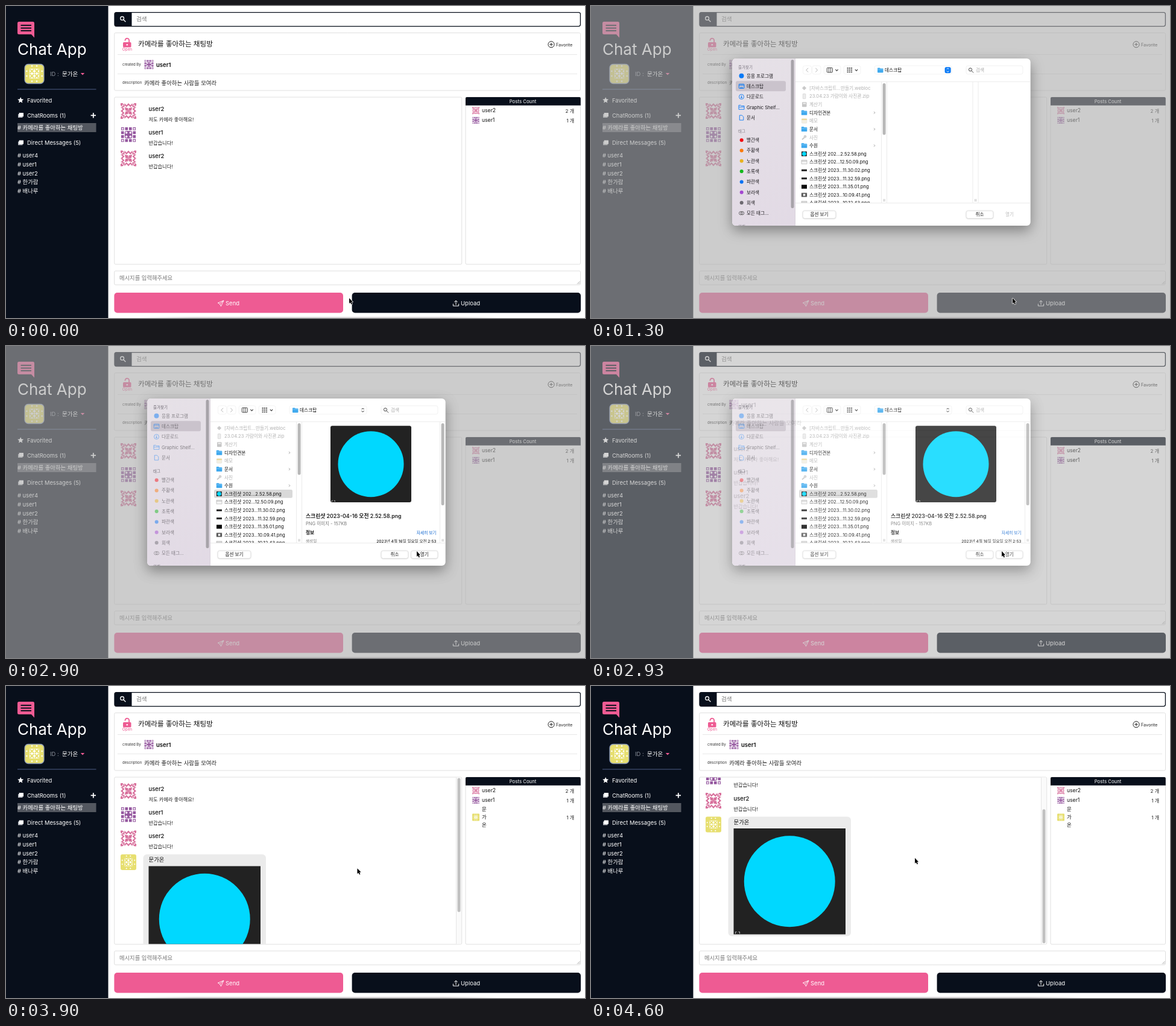
An HTML page with a canvas that plays this animation: 960 by 517 pixels, repeating every 4.73 s.

```html
<!DOCTYPE html>
<html lang="ko">
<head>
<meta charset="utf-8">
<title>Chat App</title>
<style>
html, body { margin: 0; width: 100%; height: 100%; overflow: hidden; background: #fff; }
canvas { display: block; width: 100vw; height: 100vh; }
</style>
</head>
<body>
<script>
const W = 960, H = 517, LOOP = 4730;
const FONT = 'Inter, "Noto Sans CJK KR", "Noto Sans CJK", sans-serif';
const NAVY = '#080f1b', PINK = '#ee5b93', BLUE = '#0a7af6', EDGE = '#e0e0e0';
const ME = '문가온', ONE = 'user1', TWO = 'user2';
const scale = Math.max(1, window.devicePixelRatio || 1);

function layer() {
  const el = document.createElement('canvas');
  el.width = Math.round(W * scale);
  el.height = Math.round(H * scale);
  const g = el.getContext('2d');
  g.scale(scale, scale);
  return [el, g];
}

const [stage, front] = layer();
const [sheet, back] = layer();
document.body.appendChild(stage);
let c = front;

const clamp = v => Math.min(1, Math.max(0, v));
const mix = (a, b, p) => a + (b - a) * p;

function text(s, x, y, size, color = '#111', weight = 400, align = 'left') {
  c.font = `${weight} ${size}px ${FONT}`;
  c.fillStyle = color;
  c.textAlign = align;
  c.fillText(s, x, y);
}

function box(x, y, w, h, r, fill, stroke, lw = 1) {
  c.beginPath();
  c.roundRect(x, y, w, h, r);
  if (fill) { c.fillStyle = fill; c.fill(); }
  if (stroke) { c.strokeStyle = stroke; c.lineWidth = lw; c.stroke(); }
}

function path(pts) {
  c.beginPath();
  for (let i = 0; i < pts.length; i += 2) c.lineTo(pts[i], pts[i + 1]);
}

function poly(pts, fill) {
  path(pts);
  c.fillStyle = fill;
  c.fill();
}

function line(pts, color, lw = 1) {
  path(pts);
  c.strokeStyle = color;
  c.lineWidth = lw;
  c.stroke();
}

function disc(x, y, r, fill, stroke, lw = 1) {
  c.beginPath();
  c.arc(x, y, r, 0, Math.PI * 2);
  if (fill) { c.fillStyle = fill; c.fill(); }
  if (stroke) { c.strokeStyle = stroke; c.lineWidth = lw; c.stroke(); }
}

function clipped(x, y, w, h, draw) {
  c.save();
  c.beginPath();
  c.rect(x, y, w, h);
  c.clip();
  draw();
  c.restore();
}

function lens(x, y, r, color, lw) {
  disc(x, y, r, null, color, lw);
  line([x + r * 0.7, y + r * 0.7, x + r * 2, y + r * 2], color, lw);
}

function star(x, y, r) {
  const pts = [];
  for (let i = 0; i < 10; i++) {
    const a = i * Math.PI / 5 - Math.PI / 2, d = i % 2 ? r * 0.45 : r;
    pts.push(x + d * Math.cos(a), y + d * Math.sin(a));
  }
  poly(pts, '#fff');
}

function diamond(x, y, r, fill) {
  poly([x, y - r, x + r, y, x, y + r, x - r, y], fill);
}

// Avatars live on a 4 x 4 grid: a ring of 12 tiles around a 2 x 2 heart.
const avatars = {
  yellow() {
    const ink = '#e7df70';
    box(0, 0, 4, 4, 0.45, ink);
    for (const i of [1, 3]) {
      const m = i === 1 ? 0.42 : 3.58;
      for (const j of [1.5, 2.5]) {
        diamond(j, m, 0.2, '#fff');
        diamond(m, j, 0.2, '#fff');
      }
    }
    box(1, 1, 2, 2, 0, '#fff');
    for (const x of [1.5, 2.5]) for (const y of [1.5, 2.5]) {
      line([x - 0.4, y - 0.4, x + 0.4, y + 0.4], ink, 0.26);
      line([x - 0.4, y + 0.4, x + 0.4, y - 0.4], ink, 0.26);
    }
  },
  purple() {
    const ink = '#95579f';
    for (let i = 0; i < 16; i++) {
      const x = i % 4, y = i >> 2;
      if (x % 3 && y % 3) continue;
      box(x + 0.14, y + 0.14, 0.72, 0.72, 0, ink);
      if (x % 3 === 0 && y % 3 === 0) diamond(x + 0.5, y + 0.5, 0.26, '#fff');
    }
    box(1.05, 1.05, 1.9, 1.9, 0.5, ink);
    for (const x of [1.5, 2.5]) for (const y of [1.5, 2.5]) diamond(x, y, 0.32, '#fff');
  },
  pink() {
    const ink = '#d8709c';
    for (let side = 0; side < 4; side++) {
      c.save();
      c.translate(2, 2);
      c.rotate(side * Math.PI / 2);
      for (const x of [-1, 0]) {
        poly([x, -2, x + 0.5, -1.45, x + 1, -2, x + 1, -1.5, x + 0.5, -1, x, -1.5], ink);
      }
      poly([-2, -2, -1.5, -2, -1, -1.5, -1, -1, -1.5, -1, -2, -1.5], ink);
      diamond(-1.45, -1.45, 0.22, '#fff');
      poly([-0.95, -0.95, -0.1, -0.75, 0, 0, -0.75, -0.1], ink);
      c.restore();
    }
  }
};

function avatar(kind, x, y, size) {
  c.save();
  c.translate(x, y);
  c.scale(size / 4, size / 4);
  avatars[kind]();
  c.restore();
}

function picture(x, y, w, h, r = 0) {
  box(x, y, w, h, r, '#222');
  disc(x + w / 2, y + h / 2, h * 0.43, '#00d8ff');
  if (w > 50) {
    const k = w / 185;
    line([x + 3 * k, y + h - 1, x + 3 * k, y + h - 4 * k, x + 5 * k, y + h - 4 * k], '#ddd', 0.8);
    line([x + 8 * k, y + h - 4 * k, x + 10 * k, y + h - 4 * k, x + 10 * k, y + h - 1], '#ddd', 0.8);
  }
}

function roomsIcon(y) {
  box(20, y - 2, 7.5, 6, 0.5, '#b9bcc2');
  box(21.6, y - 4, 7.4, 6.2, 0.5, '#fff');
}

function sidebar() {
  box(0, 0, 169.5, H, 0, NAVY);
  box(19, 26, 28, 21, 2.5, PINK);
  poly([41, 46, 47, 43, 47, 52.5], PINK);
  for (const y of [32, 36.6, 41]) line([24.5, y, 42, y], NAVY, 1.9);
  text('Chat App', 19, 81, 26, '#fff');

  box(31, 96, 32, 32, 6, '#fff');
  c.save();
  c.beginPath();
  c.roundRect(31, 96, 32, 32, 6);
  c.clip();
  avatar('yellow', 31, 96, 32);
  c.restore();
  box(31, 96.5, 32, 32, 6, null, '#8796b8', 1.3);
  text('ID :', 73, 116, 9.4, '#8d929b');
  text(ME, 93, 116, 9.5, '#fff', 500);
  poly([123.8, 111, 130.2, 111, 127, 114.6], PINK);
  line([19, 138, 149.5, 138], '#4f5e86');

  star(24.2, 156.3, 5.3);
  text('Favorited', 35, 159.7, 9.4, '#fff');
  roomsIcon(181);
  text('ChatRooms (1)', 35, 184.6, 9.4, '#fff');
  line([140.6, 181.3, 149, 181.3], '#fff', 1.8);
  line([144.8, 177.1, 144.8, 185.5], '#fff', 1.8);
  box(19, 194, 130.5, 15, 0, '#53575f');
  text('# 카메라를 좋아하는 채팅방', 19, 205.2, 9.4, '#fff');
  roomsIcon(226.5);
  text('Direct Messages (5)', 35, 230.2, 9.4, '#fff');
  ['user4', ONE, TWO, '한가람', '배나루'].forEach((n, i) =>
    text('# ' + n, 19, 251 + i * 14.8, 9.4, '#fff'));
}

function header() {
  box(180, 10.6, 772.4, 23, 3, '#fff', NAVY, 1.3);
  box(180, 10.6, 28.5, 23, [3, 0, 0, 3], NAVY);
  lens(192.6, 20.4, 2.9, '#fff', 1.3);
  text('검색', 216, 25.3, 9.6, '#777');

  box(179.7, 44.5, 772.8, 95.5, 2, '#fff', EDGE);
  box(194, 60, 13.5, 8.6, 1.5, PINK);
  c.beginPath();
  c.arc(200.8, 57, 3.3, Math.PI * 0.95, Math.PI * 2);
  c.lineTo(204.1, 60.5);
  c.strokeStyle = PINK;
  c.lineWidth = 1.8;
  c.stroke();
  disc(200.8, 64.2, 1.3, '#fff');
  text('Open', 201, 74, 6.4, PINK, 400, 'center');
  text('카메라를 좋아하는 채팅방', 219, 66.7, 11.6);
  disc(904, 63.7, 5.1, null, '#222', 1);
  line([901.3, 63.7, 906.7, 63.7], '#222');
  line([904, 61, 904, 66.4], '#222');
  text('Favorite', 912, 66.8, 7.2, '#222');
  line([185, 80.5, 947, 80.5], '#e8e8e8');
  line([185, 112.5, 947, 112.5], '#e8e8e8');
  text('created By', 193, 99, 6, '#333');
  avatar('purple', 229, 89, 16);
  text(ONE, 249, 100.7, 9.5, '#111', 600);
  text('description', 193, 129.2, 6.1, '#333');
  text('카메라 좋아하는 사람들 모여라', 229, 130.6, 9.4, '#222');
}

function chat(posted, loaded, scroll) {
  box(179.7, 151, 576, 277, 2, '#fff', EDGE);
  clipped(180.2, 151.5, 575, 276, () => {
    const rows = [
      ['pink', TWO, '저도 카메라 좋아해요!'],
      ['purple', ONE, '반갑습니다!'],
      ['pink', TWO, '반갑습니다!']
    ];
    rows.forEach(([kind, name, body], i) => {
      const y = 161 + i * 39.2 - scroll;
      avatar(kind, 190, y, 26);
      text(name, 236.5, y + 13, 9.5, '#111', 500);
      text(body, 236.5, y + 29.7, 8.2, '#222');
    });
    if (posted) {
      const y = 279 - scroll;
      avatar('yellow', 190, y, 26);
      box(227.5, y, loaded ? 203.5 : 44, loaded ? 198 : 37, 6, '#ebebeb');
      text(ME, 236.5, y + 12.3, 9.4);
      if (loaded) picture(236.5, y + 19.5, 185.5, 175.5);
    }
    if (loaded) {
      box(746, 151, 9.5, 277, 0, '#fafafa');
      line([746.5, 151, 746.5, 428], '#e6e6e6');
      box(748.5, 152.5 + scroll * 0.826, 5, 222, 2.5, '#c1c1c1');
    }
  });
}

function counts(posted) {
  box(762, 151, 190.5, 277, 2, '#fff', EDGE);
  box(762, 151, 190.8, 13.8, [2, 2, 0, 0], NAVY);
  text('Posts Count', 857, 160.8, 7.8, '#fff', 400, 'center');
  avatar('pink', 773, 167.3, 12);
  text(TWO, 789, 175.9, 8.6);
  text('2 개', 942, 176.6, 8, '#222', 400, 'right');
  avatar('purple', 773, 183.4, 12);
  text(ONE, 789, 192, 8.6);
  text('1 개', 942, 192.6, 8, '#222', 400, 'right');
  if (!posted) return;
  avatar('yellow', 773, 211.5, 12);
  [...ME].forEach((ch, i) => text(ch, 789, 207 + i * 13, 8.4));
  text('1 개', 942, 220.8, 8, '#222', 400, 'right');
}

function footer() {
  box(179.7, 439, 772.8, 23, 2, '#fff', '#dedede');
  text('메시지를 입력해주세요', 188, 453.9, 9.3, '#777');
  line([947, 460.7, 951.5, 456.2], '#888', 0.7);
  line([949.5, 460.7, 951.5, 458.7], '#888', 0.7);

  box(179.4, 475, 379.6, 33.4, 5, PINK);
  line([361, 488, 351.3, 492, 354.6, 493.8, 356.4, 497.6, 361, 488, 354.6, 493.8], '#fff', 0.9);
  text('Send', 364, 495.5, 9.5, '#fff');
  box(573.6, 475, 379.4, 33.4, 5, NAVY);
  line([741.4, 493.5, 741.4, 497, 750.6, 497, 750.6, 493.5], '#fff', 1);
  line([746, 495, 746, 488.3], '#fff', 1);
  line([743.3, 490.8, 746, 488.1, 748.7, 490.8], '#fff', 1);
  text('Upload', 754, 495.5, 9.5, '#fff');

  const g = c.createLinearGradient(222, 0, 815, 0);
  g.addColorStop(0, 'rgba(150,140,146,0)');
  g.addColorStop(0.15, 'rgba(150,140,146,.3)');
  g.addColorStop(0.85, 'rgba(150,140,146,.3)');
  g.addColorStop(1, 'rgba(150,140,146,0)');
  box(222, 515, 593, 2, 0, g);
}

function folder(x, y, color = '#3fa9ee') {
  box(x, y - 4, 4.5, 3, 0.8, color);
  box(x, y - 3, 9.5, 7, 0.9, color);
  line([x, y - 1.4, x + 9.5, y - 1.4], '#9bd6fa', 0.6);
}

function placeIcon(i, y) {
  if (i === 0) disc(249.5, y, 4, BLUE);
  if (i === 1) {
    box(245.3, y - 3.6, 8.6, 7, 0.8, null, BLUE);
    line([245.3, y - 1.8, 253.9, y - 1.8], BLUE);
    line([247, y + 2, 252, y + 2], BLUE);
  }
  if (i === 2) {
    disc(249.5, y, 4, null, BLUE, 0.9);
    line([249.5, y - 2.2, 249.5, y + 2], BLUE, 0.9);
    line([247.8, y + 0.4, 249.5, y + 2.1, 251.2, y + 0.4], BLUE, 0.9);
  }
  if (i === 3) {
    line([245, y + 3.5, 245, y - 3.3, 248.3, y - 3.3, 249.3, y - 2.2, 254, y - 2.2, 254, y + 3.5, 245, y + 3.5], BLUE, 0.9);
    line([245, y - 0.4, 254, y - 0.4], BLUE, 0.9);
  }
  if (i === 4) line([246.3, y - 4, 250.3, y - 4, 252.8, y - 1.5, 252.8, y + 4, 246.3, y + 4, 246.3, y - 4], BLUE, 0.9);
}

const PLACES = ['응용 프로그램', '데스크탑', '다운로드', 'Graphic Shelf...', '문서'];
const TAGS = [
  ['빨간색', '#f20d12'], ['주황색', '#fb7a0c'], ['노란색', '#e8b21f'], ['초록색', '#12b81c'],
  ['파란색', '#0b72f4'], ['보라색', '#a347d1'], ['회색', '#6c6970']
];

function places(idle) {
  const g = c.createLinearGradient(234, 87, 338, 364);
  g.addColorStop(0, '#e6e1e7');
  g.addColorStop(1, '#e2dae5');
  box(234, 87, 104.5, 277, [6, 0, 0, 6], g);
  line([338.5, 87, 338.5, 364], '#d2cbd3', 0.8);
  box(331.5, 89, 5, 246, 2.5, '#a7a3a9');
  const head = idle ? '#736e78' : '#817c86';
  text('즐겨찾기', 244, 103.7, 6.5, head, 500);
  text('태그', 244, 210.4, 6.5, head, 500);
  clipped(234, 350, 100, 14, () => text('위치', 244, 368.2, 6.5, head, 500));
  box(240, 124.3, 83, 17, 3, '#cac3cc');
  c.save();
  c.globalAlpha = idle ? 0.48 : 1;
  PLACES.forEach((name, i) => {
    const y = 115.7 + i * 17.35;
    placeIcon(i, y);
    text(name, 258, y + 2.8, 7.6, '#1c1a1e');
  });
  TAGS.forEach(([name, color], i) => {
    const y = 222.2 + i * 17.3;
    disc(249.7, y, 3, color);
    text(name, 258, y + 2.8, 7.6, '#1c1a1e');
  });
  box(245.5, 340.6, 5.5, 5.4, 2.7, null, '#444', 0.8);
  disc(251, 343.3, 2.7, null, '#444', 0.8);
  text('모든 태그...', 258, 346.2, 7.6, '#1c1a1e');
  c.restore();
}

function toolbar(idle) {
  for (const [x, w] of [[351.5, 14], [367, 14], [386, 28], [419, 28]]) box(x, 99, w, 14, 3, '#fff', '#f0f0f0', 0.8);
  line([360, 102.8, 356.8, 106.2, 360, 109.6], '#b5b5b5');
  line([372.3, 102.8, 375.5, 106.2, 372.3, 109.6], '#b5b5b5');
  box(391.3, 102.4, 9, 7.6, 0.8, null, '#444');
  for (const x of [394.3, 397.3]) line([x, 102.4, x, 110], '#444', 0.9);
  for (let i = 0; i < 9; i++) box(424.5 + i % 3 * 3.2, 102 + (i / 3 | 0) * 3.2, 2.2, 1.9, 0, '#555');
  for (const x of [407.5, 440]) line([x - 2.1, 105.2, x, 107.5, x + 2.1, 105.2], '#333', 1.1);

  box(470, 99, 128, 14, 3, '#fff', '#f0f0f0', 0.8);
  folder(475, 106.4);
  text('데스크탑', 487, 109, 7.7);
  if (!idle) box(586.6, 101.2, 10, 10, 2.5, BLUE);
  const tick = idle ? '#222' : '#fff';
  line([589.7, 105, 591.6, 103, 593.5, 105], tick);
  line([589.7, 107.4, 591.6, 109.4, 593.5, 107.4], tick);
  box(622, 99, 94, 14, 3, '#fff', '#eee', 0.8);
  lens(629, 105.4, 2.6, '#444', 1);
  text('검색', 638, 109, 7.7, '#aaa');
  line([339, 125.5, 728.5, 125.5], '#e8e8e8', 0.8);
}

const SHOT = '스크린샷 202';
const FILES = [
  '[자바스크립트…만들기.webloc', '23.04.23 가람이와 사진관.zip', '계산기', '디자인견본', '메모', '문서', '사진', '수원',
  SHOT + '...2.52.58.png', SHOT + '...12.50.09.png', SHOT + '3...11.30.02.png', SHOT + '3...11.32.59.png',
  SHOT + '3...11.35.01.png', SHOT + '3...10.09.41.png', SHOT + '3...10.12.43.png'
];
const FOLDERS = [3, 5, 7];

function fileIcon(i, y) {
  if (FOLDERS.includes(i)) return folder(348.8, y);
  if (i === 0) return diamond(353.5, y, 3.6, '#c9c9c9');
  if (i === 1) return box(351.3, y - 4, 4.6, 8, 0.6, '#ececec', '#ccc', 0.6);
  if (i === 2) { box(350, y - 4, 7.5, 8, 1, '#c6c6c6'); return box(351.4, y - 2.8, 4.7, 2, 0, '#eee'); }
  if (i === 4) { box(349.3, y - 3.8, 8.6, 7.6, 1, '#f3efe2', '#ddd', 0.5); return box(349.3, y - 3.8, 8.6, 2.2, 0, '#ecd99c'); }
  if (i === 6) { disc(355, y - 1.4, 2.4, '#d2d2d2'); return line([350, y + 3.5, 354, y], '#c8c8c8', 1.8); }
  if (i === 8) return picture(349, y - 4, 8.8, 8);
  if (i === 10 || i === 11) return box(349, y - 1.5, 9, 3, 0, '#222');
  if (i === 12) return box(349, y - 3.2, 9, 6.6, 0, '#0a0a0a');
  box(349, y - 3.2, 9, 6.4, 0, i === 13 ? '#444' : '#f4f4f4', '#aaa', 0.6);
  if (i === 13) box(351.5, y - 1.8, 4, 3.6, 0, '#eee');
  else line([349, y - 1.5, 358, y - 1.5], '#aaa', 0.8);
}

function grip(x) {
  line([x - 1, 319.8, x - 1, 324], '#aaa', 0.7);
  line([x + 1, 319.8, x + 1, 324], '#aaa', 0.7);
}

function gutter(x) {
  line([x, 126, x, 326], '#e6e6e6', 0.8);
  line([x + 9, 126, x + 9, 326], '#e6e6e6', 0.8);
  grip(x + 4.6);
}

function files(picked, idle) {
  FILES.forEach((name, i) => {
    const y = 136 + i * 13.62, on = picked && i === 8;
    if (on) box(345, y - 6.9, 130, 13.8, 2.5, idle ? '#d9d9d9' : '#0a5fd9');
    fileIcon(i, y);
    const dim = i < 7 && !FOLDERS.includes(i);
    text(name, 362, y + 2.8, 7.7, on && !idle ? '#fff' : dim ? '#b2b2b2' : '#151515');
    if (FOLDERS.includes(i)) line([469, y - 1.8, 470.8, y, 469, y + 1.8], '#888', 0.8);
  });
  gutter(481.5);
  box(483.6, 128, 5, 85.5, 2.5, '#b8b8b8');
}

function preview(shown) {
  gutter(719.5);
  box(721.6, 128, 5, 136, 2.5, '#b8b8b8');
  if (shown) picture(538, 132.3, 134, 126.8, 3);
  text('스크린샷 2023-04-16 오전 2.52.58.png', 497, 285.2, 8.8, '#222', 600);
  text('PNG 이미지 - 157KB', 497, 297.2, 7.5, '#777');
  text('정보', 497, 312.2, 7.6, '#111', 600);
  text('자세히 보기', 713.5, 312, 6.7, '#0b63ce', 400, 'right');
  text('생성일', 497, 326, 6.6, '#777');
  text('2023년 4월 16일 일요일 오전 2:53', 713.5, 326, 6.6, '#222', 500, 'right');
}

function button(label, x, w, fill, ink, edge) {
  c.save();
  c.shadowColor = 'rgba(0,0,0,.16)';
  c.shadowBlur = 1.5 * scale;
  c.shadowOffsetY = 0.5 * scale;
  box(x, 339, w, 13, 3.5, fill, edge, 0.6);
  c.restore();
  text(label, x + w / 2, 348.2, 7.6, ink, 400, 'center');
}

function dialog(picked, shown, idle) {
  c.clearRect(0, 0, W, H);
  box(0, 0, W, H, 0, 'rgba(172,172,172,.61)');
  c.save();
  c.shadowColor = 'rgba(0,0,0,.38)';
  c.shadowBlur = 22 * scale;
  c.shadowOffsetY = 8 * scale;
  box(234, 87, 494.7, 277, 6, '#fff');
  c.restore();
  places(idle);
  toolbar(idle);
  clipped(339, 126, 389.5, 200.3, () => {
    files(picked, idle);
    if (picked) preview(shown);
    else gutter(633);
  });
  line([339, 326.5, 728.5, 326.5], '#e6e6e6', 0.8);
  button('옵션 보기', 351, 55, '#fff', '#222', '#ddd');
  button('취소', 622, 45, '#fff', '#222', '#ddd');
  if (!picked) text('열기', 694, 348.2, 7.6, '#bdbdbd', 400, 'center');
  else if (idle) button('열기', 671.5, 44.5, '#fff', '#222', '#ddd');
  else button('열기', 671.5, 44.5, BLUE, '#fff');
}

// time, x, y of the pointer tip
const MOVES = [
  [30, 569, 484], [530, 694, 484], [570, 694, 484], [670, 699, 484], [1330, 699, 484],
  [1800, 515, 300], [2100, 419, 246], [2370, 419, 246], [2830, 681, 340], [3100, 681, 340],
  [3370, 640, 321], [3530, 640, 321], [3630, 619, 311.5], [3730, 619, 311.5],
  [4030, 558, 296], [4130, 537, 285]
];

function pointer(t) {
  let i = MOVES.findIndex(m => m[0] > t);
  if (i < 0) i = MOVES.length;
  const a = MOVES[Math.max(0, i - 1)], b = MOVES[Math.min(i, MOVES.length - 1)];
  const p = b[0] > a[0] ? clamp((t - a[0]) / (b[0] - a[0])) : 0;
  const e = p * p * (3 - 2 * p);
  const x = mix(a[1], b[1], e), y = mix(a[2], b[2], e);
  const arrow = [0, 0, 0, 9, 2, 7.2, 3.5, 10.4, 5, 9.7, 3.6, 6.6, 6.2, 6.4, 0, 0].map((v, k) => v + (k % 2 ? y : x));
  c.lineJoin = 'round';
  line(arrow, '#fff', 1.4);
  poly(arrow, '#000');
  c.lineJoin = 'miter';
}

function draw(now) {
  // the picture advances 30 times a second
  const t = Math.floor((now % LOOP + 4) * 0.03) / 0.03;
  const posted = t >= 3529, loaded = t >= 3865;
  const p = clamp((t - 4400) / 200);
  const scroll = t < 4399 ? 0 : mix(6.8, 62.5, 1 - (1 - p) ** 2);

  c = front;
  c.globalAlpha = 1;
  box(0, 0, W, H, 0, '#fff');
  sidebar();
  header();
  chat(posted, loaded, scroll);
  counts(posted);
  footer();

  const alpha = t < 1299 ? 0 : 1 - clamp((t - 2900) / 200);
  if (alpha > 0) {
    c = back;
    dialog(t >= 2132, t >= 2266, t >= 2899);
    c = front;
    c.globalAlpha = alpha;
    c.drawImage(sheet, 0, 0, W, H);
    c.globalAlpha = 1;
  }
  pointer(t);
}

const start = performance.now();
function tick() {
  draw(performance.now() - start);
  requestAnimationFrame(tick);
}
tick();
</script>
</body>
</html>
```
